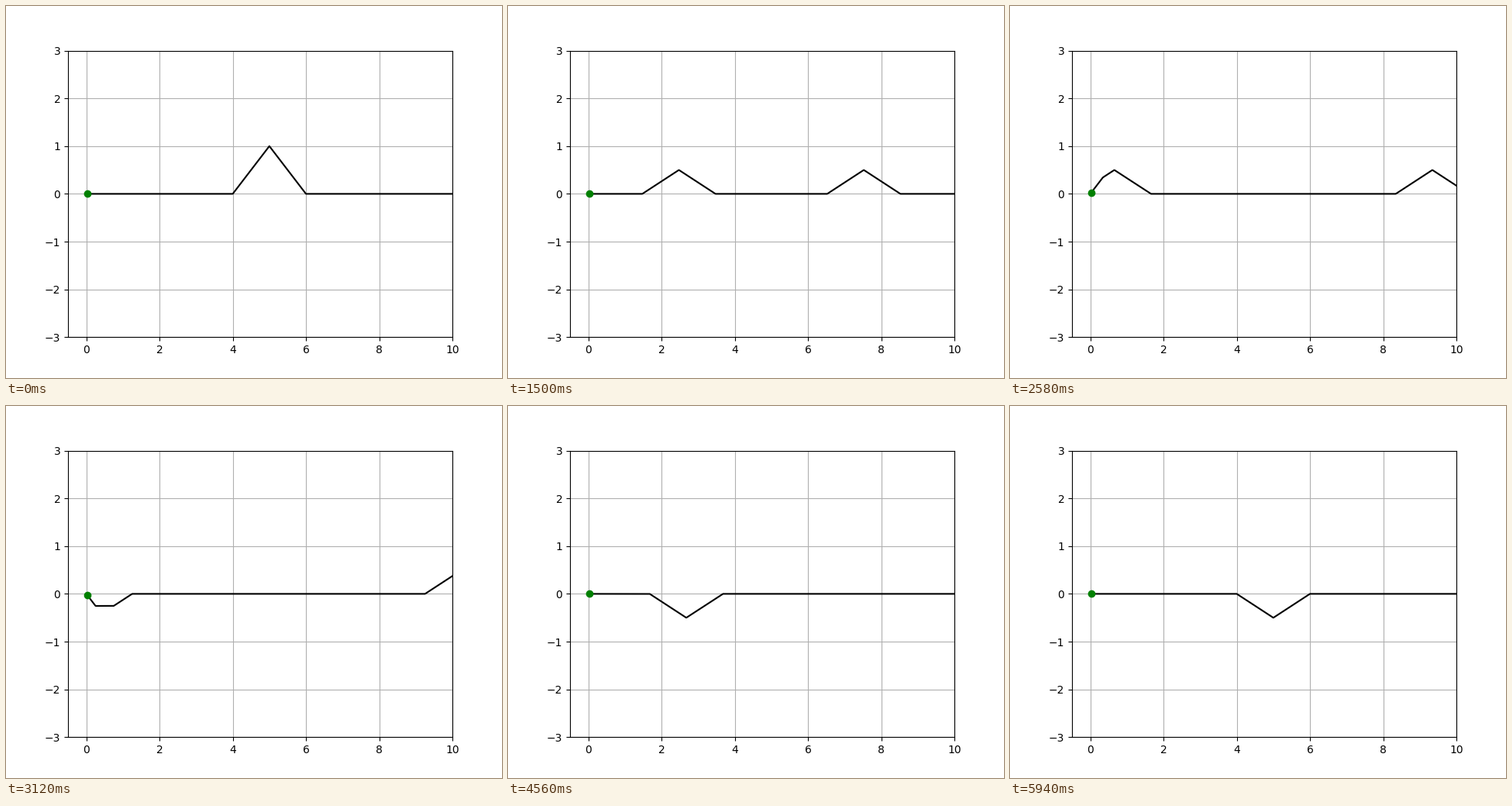
A matplotlib script for the animation above (6000 ms loop, 640 by 480 pixels).

```python
import numpy as np
import matplotlib.pyplot as plt
from matplotlib.animation import FuncAnimation

FRAMES = 100
INTERVAL = 60
SPAN = 10.0      # wave travel over one loop
X_DOT = 0.03     # position of the marked point near the fixed end


def tent(s):
    """Odd extension of a unit triangle centred at 5."""
    return np.sign(s) * np.maximum(0, 1 - np.abs(np.abs(s) - 5))


def wave(x, t):
    """Half the pulse travels each way; the left end is fixed."""
    return 0.5 * (tent(x + t) + tent(x - t))


fig, ax = plt.subplots(figsize=(6.4, 4.8), dpi=100)
ax.set_xlim(-0.5, 10)
ax.set_ylim(-3, 3)
ax.grid()

x = np.linspace(X_DOT, 10, 998)
string, = ax.plot([], [], color="black", lw=1.5)
dot, = ax.plot([], [], "o", color="green", ms=6)


def update(i):
    t = SPAN * i / (FRAMES - 1)
    string.set_data(x, wave(x, t))
    dot.set_data([X_DOT], [wave(X_DOT, t)])
    return string, dot


anim = FuncAnimation(fig, update, frames=FRAMES, interval=INTERVAL, repeat=True)
plt.show()
```
